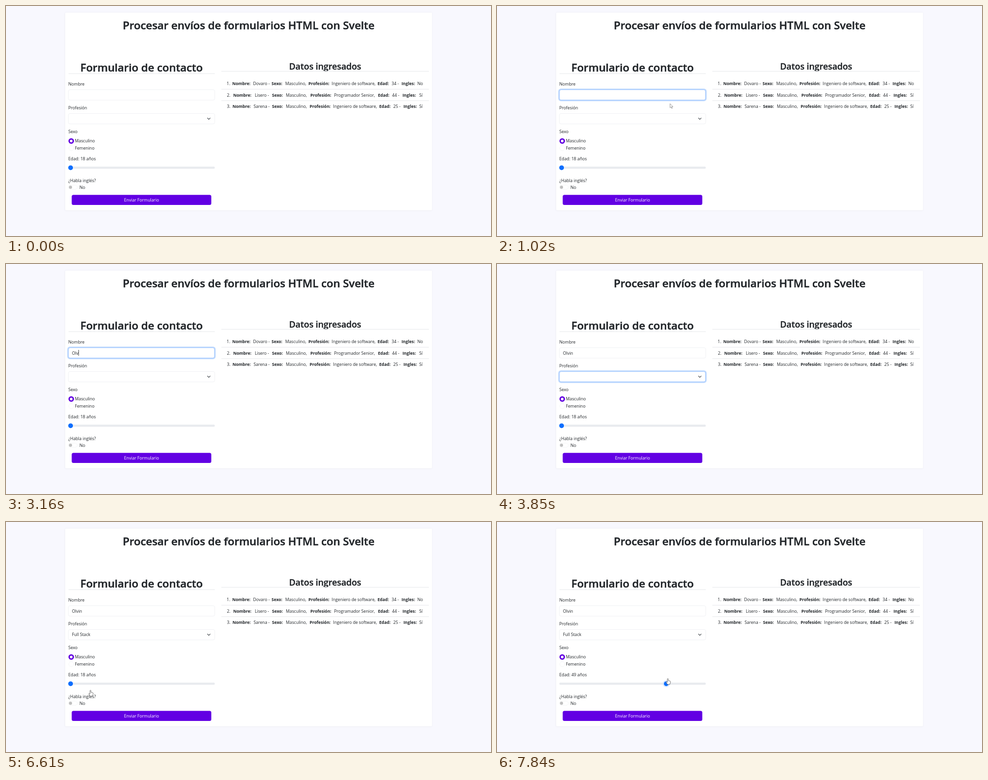
Write an HTML page that moves like this. It is 1000 px wide and 474 px high and loops after 8000 ms.

```html
<!DOCTYPE html>
<html lang="es">
<head>
<meta charset="utf-8">
<title>Formulario de contacto</title>
<style>
html, body { margin: 0; width: 100%; height: 100%; overflow: hidden; background: #f8f8fe; }
svg { display: block; width: 100%; height: 100%; }
text { font: 8.7px "Open Sans", "Noto Sans", sans-serif; fill: #212529; white-space: pre; }
.b { font-weight: 700; font-size: 8.65px; }
.h { font-weight: 600; font-size: 22.4px; text-anchor: middle; stroke: #212529; stroke-width: .5; }
.h2 { font-size: 17.9px; stroke-width: .4; }
.rule { stroke: #e6e8eb; stroke-width: 1; }
.field { fill: #fff; stroke: #eceef1; stroke-width: .8; }
.glow { fill: #fff; stroke: #86b7fe; stroke-width: .8; }
.halo { fill: #c2dbfe; }
.faint { fill: #fff; stroke: #eff1f3; stroke-width: .7; }
.cursor { fill: #fff; stroke: #555; stroke-width: .8; stroke-linejoin: round; }
</style>
</head>
<body>
<svg viewBox="0 0 1000 474" preserveAspectRatio="none" xmlns="http://www.w3.org/2000/svg">
  <defs>
    <filter id="soft" x="-5%" y="-5%" width="110%" height="110%"><feGaussianBlur stdDeviation="1.5"/></filter>
  </defs>
  <rect width="1000" height="474" fill="#f8f8fe"/>
  <rect x="121.5" y="13.5" width="757" height="408" rx="2" fill="#ececf3" filter="url(#soft)"/>
  <rect x="122" y="13.5" width="756.5" height="407.5" rx="2" fill="#fff"/>

  <text class="h" x="500.3" y="48">Procesar envíos de formularios HTML con Svelte</text>
  <text class="h" x="279.5" y="135">Formulario de contacto</text>
  <text class="h h2" x="658" y="130.5">Datos ingresados</text>
  <path class="rule" d="M129 139.5H430.5M444 134.5H872M444 171.5H872M444 195H872"/>
  <g id="rows"></g>

  <text x="128.5" y="164">Nombre</text>
  <text x="128.5" y="213">Profesión</text>
  <text x="128.5" y="262">Sexo</text>
  <text x="142" y="281">Masculino</text>
  <text x="142" y="295.5">Femenino</text>
  <text id="age" x="128.5" y="318.3"></text>
  <text x="128.5" y="363">¿Habla inglés?</text>
  <text x="151.5" y="376.8">No</text>

  <rect class="field" x="128.5" y="172.5" width="302" height="21.5" rx="3.5"/>
  <g id="nameGlow">
    <rect class="halo" x="126.3" y="170.2" width="306" height="26" rx="5.5"/>
    <rect class="glow" x="128.7" y="172.6" width="301.2" height="21.2" rx="3.5"/>
  </g>
  <text id="name" x="136" y="186.5"></text>
  <rect id="caret" y="177" width=".9" height="12" fill="#212529"/>

  <rect class="field" x="128.5" y="221.5" width="302" height="21.5" rx="3.5"/>
  <g id="jobGlow">
    <rect class="halo" x="126.3" y="219.2" width="306" height="26" rx="5.5"/>
    <rect class="glow" x="128.7" y="221.6" width="301.2" height="21.2" rx="3.5"/>
  </g>
  <text id="job" x="136" y="235.4"></text>
  <path d="M415.4 230.8L418.2 233.6L421 230.8" fill="none" stroke="#343a40" stroke-width="1.1" stroke-linecap="round" stroke-linejoin="round"/>

  <circle id="radioGlow" class="halo" cx="134.5" cy="278.3" r="7.4"/>
  <circle cx="134.5" cy="278.3" r="5.7" fill="#6200e0"/>
  <circle cx="134.5" cy="278.3" r="2.7" fill="#fff"/>
  <circle class="faint" cx="134.5" cy="293" r="5.1"/>

  <rect x="128.5" y="331" width="302" height="4.6" rx="2" fill="#e9ebef"/>
  <g id="thumb">
    <circle id="thumbGlow" r="6.9" fill="#cfe0f8"/>
    <circle r="5.6" fill="#fff"/>
    <circle r="4.9" fill="#0d6efd"/>
  </g>

  <rect class="faint" x="128.8" y="369.2" width="18" height="8.6" rx="4.3"/>
  <circle cx="133" cy="373.5" r="3.2" fill="#bfbfbf"/>

  <rect x="135.5" y="389.3" width="287.8" height="20.6" rx="3.5" fill="#6200e3"/>
  <text x="279.5" y="402.9" text-anchor="middle" style="fill:#fff">Enviar Formulario</text>

  <path id="arrow" class="cursor" d="M0 0V8.4L2 6.7L3.4 9.8L4.8 9.2L3.4 6.2H6Z"/>
  <path id="hand" class="cursor" d="M-1 .9Q0 -.6 1 .9V4.6L4.4 5.3Q5.8 5.6 5.6 7L5 9.6L4 12.4H-.6L-3.2 8.6Q-4 7 -2.6 6.8L-1 8Z"/>
</svg>
<script>
const LOOP = 8000, BLINK = 530, TRANSITION = 150;
const el = id => document.getElementById(id);
const clamp = p => Math.max(0, Math.min(1, p));
const show = (id, opacity) => el(id).setAttribute('opacity', opacity);
const place = (id, x, y) => el(id).setAttribute('transform', `translate(${x} ${y})`);
const within = (t, from, to) => t >= from && t < to;

function setText(id, value) {
  if (el(id).textContent !== value) el(id).textContent = value;
}

// Points are [time, ...values]; values run evenly between neighbours.
function track(points, t) {
  let i = 1;
  while (i < points.length - 1 && t >= points[i][0]) i++;
  const a = points[i - 1], b = points[i];
  const p = clamp((t - a[0]) / (b[0] - a[0]));
  return a.slice(1).map((v, k) => v + (b[k + 1] - v) * p);
}

const labels = ['Nombre:', 'Sexo:', 'Profesión:', 'Edad:', 'Ingles:'];
const people = [
  { y: 163.2, at: [455, 466.5, 509.5, 547.5, 575.7, 623.5, 671.5, 766, 795, 815.5, 848],
    data: ['Dovaro -', 'Masculino,', 'Ingeniero de software,', '34 -', 'No'] },
  { y: 186.8, at: [455.5, 468.5, 513, 548.5, 577, 627.5, 676.5, 767, 796, 817.5, 852],
    data: ['Lisero -', 'Masculino,', 'Programador Senior,', '44 -', 'Sí'] },
  { y: 210.2, at: [455.5, 467, 510.5, 548.5, 577, 626, 674.5, 769.5, 798.5, 819.5, 852],
    data: ['Sarena -', 'Masculino,', 'Ingeniero de software,', '25 -', 'Sí'] }
];
el('rows').innerHTML = people.map(({ y, at, data }, row) => {
  const cells = [`${row + 1}.`, ...labels.flatMap((label, i) => [label, data[i]])];
  return cells.map((cell, i) =>
    `<text x="${at[i]}" y="${y}"${i % 2 ? ' class="b"' : ''}>${cell}</text>`).join('');
}).join('');

const NAME = 'Olvin';
const keyTimes = [2610, 2960, 3160, 3320, 3520];
const jobs = [[4630, 'Ingeniero de software'], [4790, 'Programador Senior'], [4940, 'Full Stack']];
const nameFocus = 460, jobFocus = 3690, radioFocus = 5990, radioBlur = 6240, grab = 6770;
const arrowPath = [[200, 300, 222], [320, 312, 198], [460, 318, 182], [700, 338, 190], [1000, 356.8, 201.3], [1290, 356.8, 201.3]];
const handPath = [[6480, 215, 362], [6740, 134, 331], [grab, 136, 330.2], [7250, 268, 329.2], [7840, 352.2, 322.4]];
const agePath = [[grab, 18], [7245, 35], [7835, 49]];

function focusLevel(t, from, to) {
  return clamp((t - from) / TRANSITION) * (1 - clamp((t - to) / TRANSITION));
}

function caretOn(t) {
  if (!within(t, nameFocus, jobFocus)) return false;
  if (t >= 2280) return true;
  return t < 1960 && Math.floor((t - nameFocus) / BLINK) % 2 === 0;
}

function draw(t) {
  show('nameGlow', focusLevel(t, nameFocus, jobFocus));
  show('jobGlow', focusLevel(t, jobFocus, radioFocus));
  show('radioGlow', within(t, radioFocus, radioBlur) ? 1 : 0);
  show('thumbGlow', t >= grab ? 1 : 0);

  setText('name', NAME.slice(0, keyTimes.filter(k => t >= k).length));
  const typed = el('name').textContent ? el('name').getComputedTextLength() : 0;
  el('caret').setAttribute('x', 136 + typed);
  show('caret', caretOn(t) ? 1 : 0);

  const picked = jobs.filter(job => t >= job[0]).pop();
  setText('job', picked ? picked[1] : '');

  const age = Math.floor(track(agePath, t)[0] + 1e-6);
  setText('age', `Edad: ${age} años`);
  place('thumb', 133.2 + (age - 18) * 6.96, 333.3);

  place('arrow', ...track(arrowPath, t));
  show('arrow', within(t, 200, 1290) ? .75 : 0);
  place('hand', ...track(handPath, t));
  show('hand', t >= 6480 ? 1 : 0);
}

const start = performance.now();
function tick() {
  draw((performance.now() - start) % LOOP);
  requestAnimationFrame(tick);
}
tick();
</script>
</body>
</html>
```
